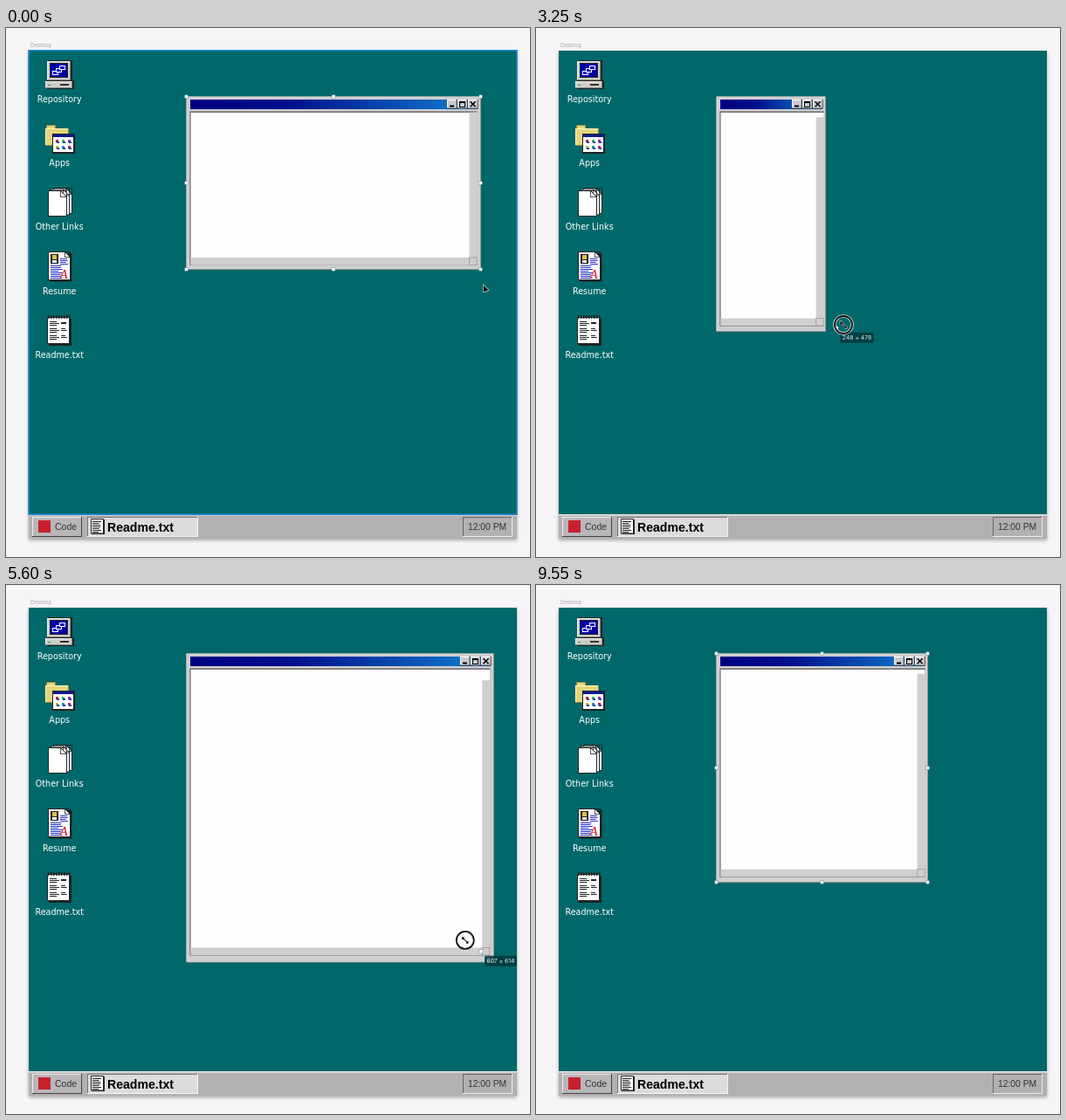
These frames come from a looping animation (600 by 606 pixels, 9600 ms). An HTML page with a canvas:

```html
<!DOCTYPE html>
<html lang="en">
<head>
<meta charset="utf-8">
<title>Desktop window resize</title>
<style>
  html, body { margin: 0; width: 100%; height: 100%; overflow: hidden; background: #f7f5f8; }
  canvas { display: block; }
</style>
</head>
<body>
<canvas id="stage" width="600" height="606"></canvas>
<script>
const ctx = document.getElementById('stage').getContext('2d');
const LOOP = 9600, STEP = 50, LAG = 50, PRESS = 500, RELEASE = 7350;
const LEFT = 206.5, TOP = 78.5;
const GREY = '#d0ced0', INK = '#222';
const SANS = '"Liberation Sans", Arial, sans-serif';

// Key points of the pointer: time, x, y
const path = [
  [0, 547, 299], [PRESS, 543, 276], [1400, 572, 515], [1950, 507, 483],
  [2050, 453, 478], [2600, 24, 400], [3150, 331, 347], [3250, 352, 340],
  [3800, 510, 270], [4800, 413, 437], [4900, 417, 463], [5400, 570, 450],
  [6250, 254, 265], [6350, 257, 285], [RELEASE, 448, 340], [7750, 511, 414]
];

function slope(i, axis) {
  const a = path[Math.max(0, i - 1)], b = path[Math.min(path.length - 1, i + 1)];
  const p = path[i][axis];
  // Flat at turning points, so the path does not overshoot
  if ((p - a[axis]) * (b[axis] - p) <= 0) return 0;
  return (b[axis] - a[axis]) / (b[0] - a[0]);
}

function pointer(t) {
  let i = path.findIndex(k => k[0] > t) - 1;
  if (i < 0) i = path.length - 2;
  const a = path[i], b = path[i + 1], span = b[0] - a[0];
  const u = Math.min(1, (t - a[0]) / span), v = 1 - u;
  return [1, 2].map(n =>
    v * v * (1 + 2 * u) * a[n] + u * u * (3 - 2 * u) * b[n] +
    span * u * v * (v * slope(i, n) - u * slope(i + 1, n)));
}

const dragged = t => pointer(Math.min(RELEASE, Math.max(PRESS, t)));

function rect(color, x, y, w, h) {
  ctx.fillStyle = color;
  ctx.fillRect(x, y, w, h);
}

function frameRect(color, width, x, y, w, h) {
  ctx.strokeStyle = color;
  ctx.lineWidth = width;
  ctx.strokeRect(x, y, w, h);
}

function text(str, x, y, font, color, align = 'left') {
  ctx.font = font;
  ctx.fillStyle = color;
  ctx.textAlign = align;
  ctx.fillText(str, x, y);
}

function bevel(face, light, dark, x, y, w, h) {
  rect(dark, x, y, w, h);
  rect(light, x, y, w - 1, h - 1);
  rect(face, x + 1, y + 1, w - 2, h - 2);
}

// Rows of fake writing with repeatable ragged ends
function writing(color, x, y, width, rows) {
  for (let i = 0; i < rows; i++) {
    rect(color, x, y + i * 2, width * (.65 + .35 * Math.abs(Math.sin(i * 5 + x))), 1);
  }
}

function page(x, y, w, h, fold = 0) {
  ctx.beginPath();
  ctx.moveTo(x, y);
  ctx.lineTo(x + w - fold, y);
  ctx.lineTo(x + w, y + fold);
  ctx.lineTo(x + w, y + h);
  ctx.lineTo(x, y + h);
  ctx.closePath();
  ctx.fillStyle = '#fff';
  ctx.fill();
  ctx.strokeStyle = INK;
  ctx.lineWidth = 1;
  ctx.stroke();
  if (fold) frameRect(INK, .8, x + w - fold, y, fold, fold);
}

function computerIcon() {
  rect(INK, 48, 37, 28, 24);
  bevel('#cfcfc8', '#eee', '#888', 47, 38, 27, 22);
  rect(INK, 50, 40, 21, 17);
  rect('#0000a8', 51, 41, 19, 15);
  for (let i = 0; i < 3; i++) {
    rect('#fff', 53 + i * 4, 49 - i * 3, 7, 5);
    rect('#0000d8', 54 + i * 4, 50 - i * 3, 5, 3);
  }
  rect(INK, 47, 60, 31, 10);
  bevel('#cfcfc8', '#eee', '#888', 45, 61, 31, 8);
  rect('#00a060', 48, 65, 3, 1);
  rect('#333', 62, 64, 10, 2);
}

function appsIcon() {
  rect('#94853c', 46, 111, 11, 5);
  rect('#e4d57c', 47, 112, 9, 4);
  bevel('#e4d57c', '#fff6b8', '#94853c', 45, 115, 27, 20);
  rect(INK, 53, 121, 26, 23);
  rect('#fff', 54, 122, 23, 20);
  rect('#0a1a90', 54, 122, 23, 3);
  for (let i = 0; i < 6; i++) {
    const x = 57 + i % 3 * 7, y = 128 + Math.floor(i / 3) * 7;
    rect(`hsl(${i * 140}, 70%, 45%)`, x, y, 3, 3);
    rect('#2040b0', x + 1, y + 2, 3, 2);
  }
}

function linksIcon() {
  for (let d = 6; d >= 0; d -= 3) page(48.5 + d, 186.5 - d / 2, 21, 29, 7);
}

function resumeIcon() {
  rect(INK, 50, 258, 25.5, 32.5);
  page(48.5, 256.5, 25, 32, 6);
  rect(INK, 51, 259, 9, 11);
  rect('#e0c040', 53, 260, 5, 5);
  rect('#fff', 53, 266, 5, 3);
  writing('#2030c0', 62, 264, 9, 4);
  writing('#2030c0', 51, 272, 14, 8);
  text('A', 66, 287, 'italic 15px "Liberation Serif", serif', '#d01020', 'center');
}

function notepadIcon() {
  rect(INK, 49, 333, 26, 31);
  page(47.5, 331.5, 25, 30);
  for (let x = 48; x < 73; x += 3) rect(INK, x, 329, 1.5, 4);
  rect(INK, 63, 337, 6, 2);
  for (let y = 336; y < 358; y += 8) writing(INK, 50, y, 11, 3);
  for (let y = 344; y < 358; y += 8) writing(INK, 63, y, 7, 2);
}

function drawDesktop() {
  rect('#f7f5f8', 0, 0, 600, 606);
  text('Desktop', 28, 22.3, '6.2px Inter, sans-serif', '#aaa7aa');
  ctx.save();
  ctx.shadowColor = 'rgba(0,0,0,.32)';
  ctx.shadowBlur = 4;
  ctx.shadowOffsetY = 2;
  rect('#00686a', 26, 26, 559, 559);
  ctx.restore();
  for (const icon of [computerIcon, appsIcon, linksIcon, resumeIcon, notepadIcon]) icon();
  ['Repository', 'Apps', 'Other Links', 'Resume', 'Readme.txt'].forEach((name, i) =>
    text(name, 61.2, 84.8 + i * 73.25, '9.6px "DejaVu Sans", sans-serif', '#fff', 'center'));
}

function drawTaskbar() {
  rect('#b3b0b3', 26, 557, 559, 28);
  rect('#e9e7e9', 26, 557, 559, 1.5);
  bevel('#b9b6b9', '#eee', '#444', 30, 560, 57, 23);
  rect('#c8202c', 37, 564, 14, 14);
  text('Code', 56, 575, '10.5px ' + SANS, '#333');
  bevel('#dddbdd', '#777', '#f4f4f4', 93, 560, 127, 23);
  rect(INK, 98, 563, 15, 17);
  page(97.5, 562.5, 14, 16.5);
  writing(INK, 99, 565, 10, 7);
  text('Readme.txt', 116, 577, `bold 14.1px ${SANS}`, '#000');
  bevel('#b3b0b3', '#666', '#eee', 523, 560, 57, 23);
  text('12:00 PM', 529, 575, '10.3px ' + SANS, '#333');
}

function drawButton(x, kind) {
  bevel('#c9c7cc', '#fff', INK, x, 82, 11.5, 10.5);
  if (kind === 'min') rect('#000', x + 3, 88.5, 5, 2);
  if (kind === 'max') {
    frameRect('#000', 1, x + 2.5, 84.5, 6, 6);
    rect('#000', x + 2, 84, 7, 2);
  }
  if (kind === 'close') {
    ctx.strokeStyle = '#000';
    ctx.lineWidth = 1.4;
    ctx.beginPath();
    for (const s of [-3, 3]) {
      ctx.moveTo(x + 5.6 - s, 84.2);
      ctx.lineTo(x + 5.6 + s, 90.2);
    }
    ctx.stroke();
  }
}

function drawWindow(right, bottom) {
  const w = right - LEFT, h = bottom - TOP, grow = h - 197;
  // Inner margins scale slightly with the window
  const inR = right - w * .0105, inB = bottom - 4 - grow * .02;
  const barTop = 96.5 + Math.max(0, grow * .082);
  bevel(GREY, '#dcdadc', '#929092', LEFT, TOP, w + 1, h + 1);
  const blue = ctx.createLinearGradient(211, 0, right - 3, 0);
  blue.addColorStop(0, '#000080');
  blue.addColorStop(.35, '#00108c');
  blue.addColorStop(1, '#1080d0');
  rect(blue, 211, 82, right - 214, 11);
  ['min', 'max', 'close'].forEach((kind, i) => drawButton(right - 38 + i * 12, kind));
  rect('#555', 210.5, 95.5, inR - 210.5, inB - 95.5);
  rect('#fffdff', 211.5, 96.8, inR - 211.5, inB - 97.3);
  rect(GREY, inR - 9, barTop, 9, inB - barTop - .5);
  rect(GREY, 211.5, inB - 9, inR - 211.5, 8.5);
  frameRect('#999', .8, inR - 9, inB - 9, 8.5, 8.5);
}

function drawHandle(x, y) {
  rect('rgba(0,90,110,.5)', x - 2.3, y - 2.3, 4.6, 4.6);
  rect('#fff', x - 1.8, y - 1.8, 3.6, 3.6);
}

function drawSelection(right, bottom) {
  for (const i of [0, .5, 1]) {
    for (const j of [0, .5, 1]) {
      if (i !== .5 || j !== .5) drawHandle(LEFT + i * (right + .5 - LEFT), TOP + j * (bottom + .5 - TOP));
    }
  }
}

function drawSize(x, y) {
  const label = [x - LEFT, y - TOP].map(n => Math.round(Math.abs(n) * 1.8)).join(' × ');
  ctx.font = '6.8px Inter, sans-serif';
  const w = ctx.measureText(label).width + 5;
  ctx.fillStyle = 'rgba(3,58,62,.88)';
  ctx.beginPath();
  ctx.roundRect(x + 4, y + 5, w, 12, 2);
  ctx.fill();
  text(label, x + 6.5, y + 13.4, ctx.font, '#e4eeee');
}

// Strokes the current path dark on a light outline
function outlined(light, dark) {
  ctx.strokeStyle = 'rgba(255,255,255,.8)';
  ctx.lineWidth = light;
  ctx.stroke();
  ctx.strokeStyle = '#111';
  ctx.lineWidth = dark;
  ctx.stroke();
}

function drawResizePointer(x, y, pressed) {
  ctx.save();
  ctx.translate(x, y);
  if (pressed) {
    ctx.beginPath();
    ctx.arc(0, 0, 10, 0, 7);
    outlined(3.6, 1.8);
  }
  ctx.rotate(Math.PI / 4);
  ctx.beginPath();
  for (const s of [-1, 1]) {
    ctx.moveTo(0, 0);
    ctx.lineTo(s * 4.5, 0);
    ctx.moveTo(s * 3, -1.5);
    ctx.lineTo(s * 4.5, 0);
    ctx.lineTo(s * 3, 1.5);
  }
  outlined(2.4, 1.1);
  ctx.restore();
}

function drawArrow(x, y) {
  ctx.save();
  ctx.translate(x, y - 4);
  ctx.beginPath();
  ctx.moveTo(2, 4);
  ctx.lineTo(3.6, 8);
  outlined(2.6, 1.3);
  ctx.beginPath();
  ctx.moveTo(0, 0);
  ctx.lineTo(0, 7);
  ctx.lineTo(5, 5);
  ctx.closePath();
  outlined(1.6, .5);
  ctx.fillStyle = '#111';
  ctx.fill();
  ctx.restore();
}

function draw(time) {
  const t = Math.floor(time % LOOP / STEP) * STEP;
  const dragging = t > PRESS && t < RELEASE + 2 * LAG;
  const nearHandle = t > PRESS / 2 && t < RELEASE + 2 * LAG;
  const shown = t < 8500;
  const [x, y] = pointer(t);
  // The corner handle and then the window trail the pointer
  const [hx, hy] = dragged(t - LAG), [wx, wy] = dragged(t - 2 * LAG);
  const right = Math.max(LEFT + 47, wx), bottom = Math.max(TOP + 60, wy);

  drawDesktop();
  ctx.save();
  ctx.beginPath();
  ctx.rect(26, 26, 559, 559);
  ctx.clip();
  drawWindow(right, bottom);
  drawTaskbar();
  ctx.restore();
  if (shown && !nearHandle) frameRect('#1488d8', 1.6, 26, 25.8, 559, 531.4);
  if (dragging) {
    drawSize(hx, hy);
    drawHandle(hx, hy);
  } else {
    drawSelection(right, bottom);
  }
  if (nearHandle) drawResizePointer(x, y, dragging);
  else if (shown) drawArrow(x, y);
}

const start = performance.now();
function frame() {
  draw(performance.now() - start);
  requestAnimationFrame(frame);
}
frame();
</script>
</body>
</html>
```
